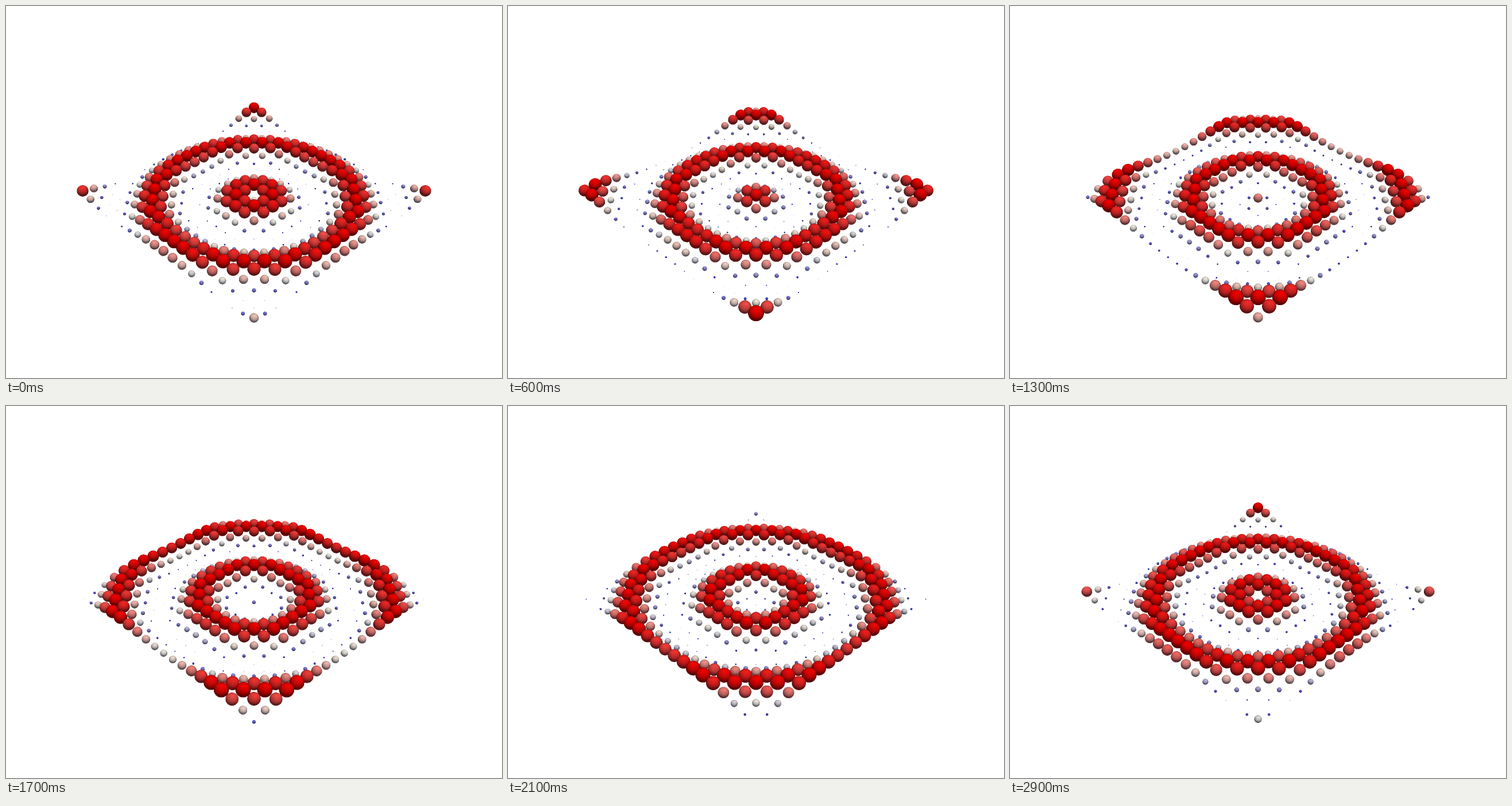
Recreate the animation shown at these times as a matplotlib script. Size 864 px wide and 648 px high, loop 3000 ms.

```python
"""Spheres on a square grid riding a circular wave that runs inwards."""
import numpy as np
import matplotlib.pyplot as plt
from matplotlib.animation import FuncAnimation

W, H = 864, 648
FRAMES, INTERVAL = 30, 100
SS = 2                                    # supersampling per axis

# Square grid, one sphere per node
gx, gy = np.meshgrid(np.arange(-10, 10), np.arange(-10, 10))
gx, gy = gx.ravel().astype(float), gy.ravel().astype(float)
dist = np.hypot(gx, gy)

# Isometric perspective camera with a 30 degree view angle
HALF_ANGLE = np.radians(15)
FOCAL = SS * (H / 2) / np.tan(HALF_ANGLE)
TARGET = np.array([-0.528, -0.528, 0.25])
CAM_DIST = 14.12 / np.sin(HALF_ANGLE)
RIGHT = np.array([-1, 1, 0]) / np.sqrt(2)
UP = np.array([-1, -1, 2]) / np.sqrt(6)
BACK = np.array([1, 1, 1]) / np.sqrt(3)

# Lights fixed to the camera: elevation, azimuth, intensity, colour
LIGHTS = [
    (50, 10, 0.75, (1, 0.973, 0.902)),
    (-75, 0, 0.25, (0.909, 0.936, 1)),
    (0, 0, 0.25, (1, 1, 1)),
    (0, 110, 0.214, (1, 1, 1)),
    (0, -110, 0.214, (1, 1, 1)),
]


def light_dir(elev, azim):
    e, a = np.radians([elev, azim])
    return np.array([np.cos(e) * np.sin(a), np.sin(e), np.cos(e) * np.cos(a)])


LIGHT_DIRS = np.array([light_dir(e, a) for e, a, _, _ in LIGHTS])
LIGHT_RGB = np.array([[i * c for c in rgb] for _, _, i, rgb in LIGHTS])

# Ray slopes through the sample centres
RAY_X = (np.arange(W * SS) + 0.5 - W * SS / 2) / FOCAL
RAY_Y = (H * SS / 2 - np.arange(H * SS) - 0.5) / FOCAL


def blue_white_red(v):
    """Colour for v in -1..1."""
    return np.array([min(1, 1 + v), 1 - abs(v), min(1, 1 - v)])


def span(center, reach, size):
    return max(0, int(center - reach)), min(size, int(center + reach) + 2)


def draw_sphere(img, depth, c, radius, color):
    """Ray-cast one sphere, given in camera space, into the buffers."""
    reach = 1.1 * FOCAL * radius / -c[2] + 1
    x0, x1 = span(W * SS / 2 - FOCAL * c[0] / c[2], reach, W * SS)
    y0, y1 = span(H * SS / 2 + FOCAL * c[1] / c[2], reach, H * SS)
    dx, dy = RAY_X[None, x0:x1], RAY_Y[y0:y1, None]

    a = dx ** 2 + dy ** 2 + 1
    b = dx * c[0] + dy * c[1] - c[2]
    disc = b ** 2 - a * (c @ c - radius ** 2)
    t = (b - np.sqrt(np.maximum(disc, 0))) / a
    zone = depth[y0:y1, x0:x1]
    hit = (disc > 0) & (t < zone)
    if not hit.any():
        return
    rows, cols = np.nonzero(hit)
    th = t[hit]
    normal = np.stack([th * dx[0, cols] - c[0],
                       th * dy[rows, 0] - c[1],
                       -th - c[2]], axis=1) / radius
    light = np.maximum(normal @ LIGHT_DIRS.T, 0) @ LIGHT_RGB
    zone[hit] = th
    img[y0:y1, x0:x1][hit] = np.minimum(light, 1) * color


def render(phase):
    wave = np.sin(dist + phase)
    pos = np.stack([gx, gy, 0.5 * wave], axis=1) - TARGET
    cam = np.stack([pos @ RIGHT, pos @ UP, pos @ BACK - CAM_DIST], axis=1)
    img = np.ones((H * SS, W * SS, 3), dtype=np.float32)
    depth = np.full((H * SS, W * SS), np.inf)
    for c, v in zip(cam, wave):
        radius = 0.25 * (1 + v)
        if radius > 1e-4:
            draw_sphere(img, depth, c, radius, blue_white_red(v))
    smooth = sum(img[i::SS, j::SS] for i in range(SS) for j in range(SS))
    return smooth / SS ** 2


fig = plt.figure(figsize=(W / 72, H / 72), dpi=72, facecolor="white")
ax = fig.add_axes([0, 0, 1, 1])
ax.axis("off")
picture = ax.imshow(render(0), interpolation="nearest", aspect="auto")


def update(i):
    picture.set_data(render(2 * np.pi * i / FRAMES))
    return [picture]


anim = FuncAnimation(fig, update, frames=FRAMES, interval=INTERVAL,
                     repeat=True, repeat_delay=0)
plt.show()
```
